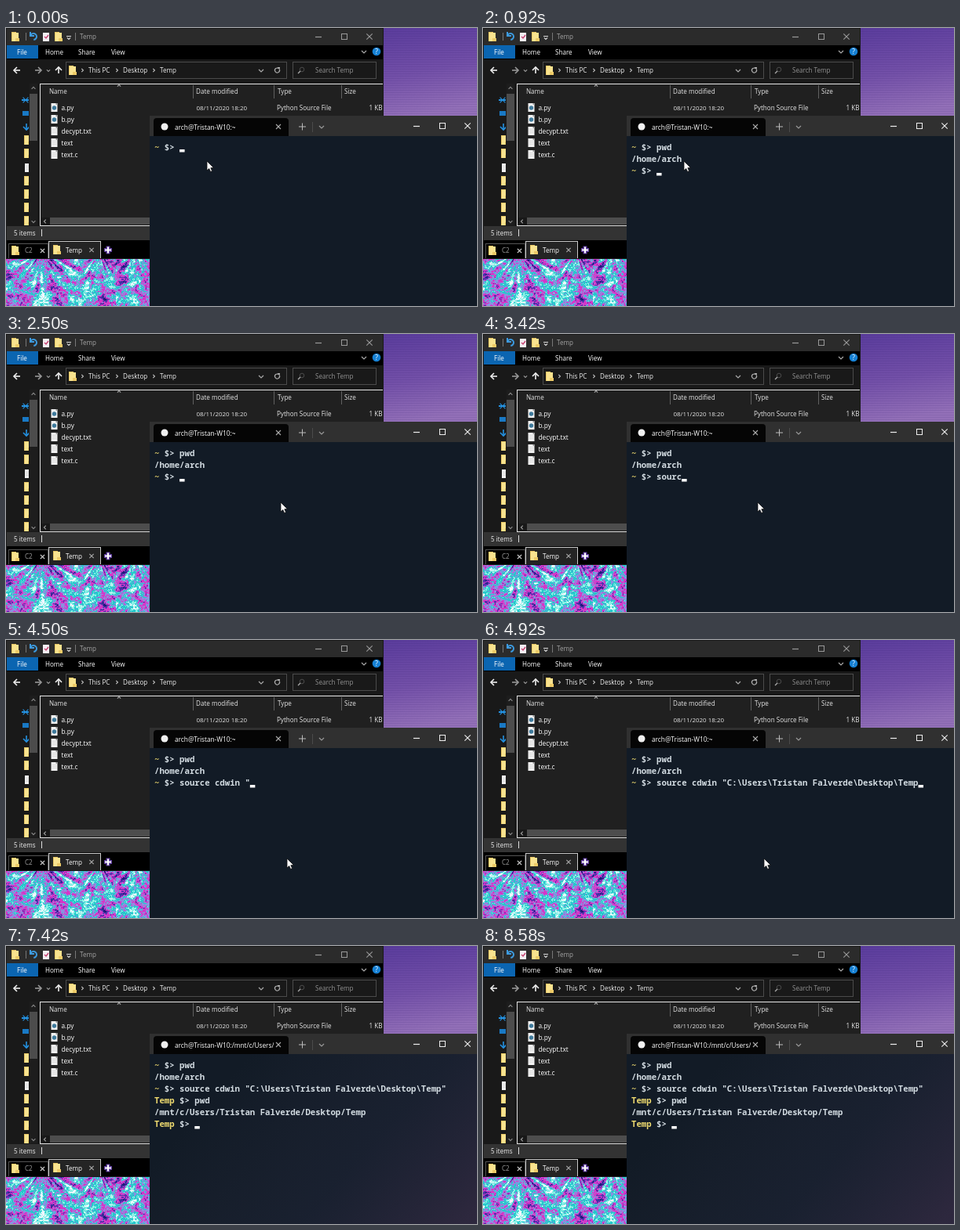
An HTML page with a canvas for the animation above (8660 ms loop, 600 by 355 pixels).

```html
<!DOCTYPE html>
<html lang="en">
<head>
<meta charset="utf-8">
<title>Jump to a folder from the terminal</title>
<style>
  html, body { margin: 0; width: 100%; height: 100%; overflow: hidden; background: #000; }
  canvas { display: block; }
</style>
</head>
<body>
<canvas id="stage" width="600" height="355"></canvas>
<script>
const ctx = document.getElementById('stage').getContext('2d');
const LOOP = 8660, STEP = 1000 / 12;
const UI = '"Open Sans", "Noto Sans", sans-serif';
const MONO = '600 10.7px "Noto Sans Mono", "DejaVu Sans Mono", monospace';
const YELLOW = '#f0dc70', PALE = '#d3dce2';
const HOST = 'Tristan-W10', USER = 'Tristan Falverde';

// Timeline, in ms
const EXPLORER_FRONT = [1410, 2410];
const PWD = [250, 620, 830], JUMP = [2900, 4350], PASTE = 4750, ENTER = 5480;
const PWD_AGAIN = [6250, 6650, 6950];
const MOUSE = [[0, 256, 170], [950, 256, 170], [1580, 246, 51], [1950, 246, 51],
               [2420, 350, 215], [3750, 350, 215], [4420, 358, 279]];
const MOUSE_HIDDEN = 5250;

function rect(x, y, w, h, fill) { ctx.fillStyle = fill; ctx.fillRect(x, y, w, h); }

function frame(x, y, w, h, color) {
  ctx.strokeStyle = color;
  ctx.lineWidth = 1;
  ctx.strokeRect(x + 0.5, y + 0.5, w - 1, h - 1);
}

function disc(x, y, r, fill) {
  ctx.fillStyle = fill;
  ctx.beginPath();
  ctx.arc(x, y, r, 0, 7);
  ctx.fill();
}

function line(color, width, ...points) {
  ctx.strokeStyle = color;
  ctx.lineWidth = width;
  ctx.beginPath();
  for (const [x, y] of points) ctx.lineTo(x, y);
  ctx.stroke();
}

function label(text, x, y, color = '#f0f0f0', size = 8.1, align = 'left') {
  ctx.font = `500 ${size}px ${UI}`;
  ctx.textAlign = align;
  ctx.fillStyle = color;
  ctx.fillText(text, x, y);
}

function chevron(x, y, dx, dy, color = '#aaa') {
  // dx, dy give the pointing direction
  line(color, 1.2, [x - dx - dy * 3, y - dy - dx * 3], [x + dx * 2, y + dy * 2],
    [x - dx + dy * 3, y - dy + dx * 3]);
}

function cross(x, y, r, color) {
  line(color, 1.1, [x - r, y - r], [x + r, y + r]);
  line(color, 1.1, [x + r, y - r], [x - r, y + r]);
}

function arrow(x, y, dx, dy, color) {
  line(color, 1.6, [x - dx * 4, y - dy * 4], [x + dx * 4, y + dy * 4]);
  line(color, 1.6, [x - dy * 4, y - dx * 4], [x + dx * 4, y + dy * 4], [x + dy * 4, y + dx * 4]);
}

function folder(x, y) {
  rect(x - 5, y - 6, 6, 12, '#e8c765');
  rect(x - 4, y - 5, 8, 11, '#f9e38f');
  rect(x, y + 2, 5, 4, '#edcb68');
}

function sheet(x, y, isPython) {
  rect(x - 4, y - 5, 8, 11, '#f1f1f1');
  rect(x + 2, y - 5, 2, 2, '#9a9a9a');
  if (isPython) disc(x, y + 1, 2.7, '#3e7a9c');
  else for (let i = -2; i < 4; i += 2) rect(x - 3, y + i, 6, 0.6, '#cfcfcf');
}

function captionButtons(xs, y, color) {
  line(color, 1.2, [xs[0] - 4, y + 0.5], [xs[0] + 4, y + 0.5]);
  frame(xs[1] - 4, y - 4, 8, 8, color);
  cross(xs[2], y, 3.7, color);
}

function hash(x, y) {
  const s = Math.sin(x * 127.1 + y * 311.7) * 43758.5453;
  return s - Math.floor(s);
}

function noise(x, y) {
  const i = Math.floor(x), j = Math.floor(y), u = x - i, v = y - j;
  const mix = (a, b, k) => a + (b - a) * k * k * (3 - 2 * k);
  return mix(mix(hash(i, j), hash(i + 1, j), u), mix(hash(i, j + 1), hash(i + 1, j + 1), u), v);
}

// Streaks that fan out downwards from the nearest summit
function mountainShade(x, y) {
  const summit = x < 92 ? 45 : x < 140 ? 118 : 165;
  const dx = x - summit, dy = y - 284;
  const streak = noise(Math.atan2(dx, dy) * 9 + summit, Math.hypot(dx, dy) / 22);
  const fold = noise((x - y) / 13, (x * 0.5 + y) / 9);
  return streak * 0.5 + fold * 0.4 + noise(x / 2.5, y / 2) * 0.35 - 0.12;
}

function paintWallpaper(g) {
  const sky = g.createLinearGradient(480, 0, 500, 115);
  sky.addColorStop(0, '#5a3c9c');
  sky.addColorStop(0.55, '#7350a8');
  sky.addColorStop(1, '#9370b8');
  g.fillStyle = sky;
  g.fillRect(480, 0, 120, 115);
  g.fillStyle = 'rgba(40,20,100,.1)';
  for (let y = 1; y < 115; y += 3) g.fillRect(480, y, 120, 1);

  const tones = ['#1c1c78', '#5434b0', '#d636c8', '#8c90e0', '#25c8cc', '#8cf0e6', '#f6f6ff'];
  for (let y = 294; y < 355; y++) {
    for (let x = 0; x < 184; x++) {
      const value = mountainShade(x, y) + (hash(x, y) - 0.5) * 0.14;
      const tone = Math.floor(value * 8 - 0.4);
      g.fillStyle = tones[Math.max(0, Math.min(tones.length - 1, tone))];
      g.fillRect(x, y, 1, 1);
    }
  }
}

const wallpaper = document.createElement('canvas');
wallpaper.width = 600;
wallpaper.height = 355;
paintWallpaper(wallpaper.getContext('2d'));

function drawToolbar(active) {
  const bright = active ? '#fff' : '#a5a5a5';
  rect(0, 0, 481, 40, '#000');
  rect(0, 40, 481, 30, '#191919');
  if (!active) rect(0, 1, 480, 21, '#2b2b2b');
  folder(12, 11);
  folder(67, 11);
  ctx.strokeStyle = '#3d9be0';
  ctx.lineWidth = 2;
  ctx.beginPath();
  ctx.arc(35, 11, 4, -2.5, 1.5);
  ctx.stroke();
  line('#3d9be0', 2, [31, 5], [31, 10], [36, 10]);
  rect(47, 6, 8, 11, '#f3eef3');
  line('#c64070', 1.4, [49, 11], [51, 13], [54, 9]);
  rect(25, 6, 1, 10, '#777');
  rect(77, 10, 6, 1, '#ddd');
  chevron(80, 13, 0, 0.7, '#ddd');
  rect(88, 6, 1, 10, '#777');
  label('Temp', 94, 14, bright);
  captionButtons([398, 431, 463], 11, active ? '#fff' : '#999');

  rect(0, 22, 41, 17, '#0b65b1');
  [['File', 14], ['Home', 50], ['Share', 92], ['View', 134]].forEach(([s, x]) => label(s, x, 34, '#fff'));
  chevron(456, 30, 0, 1);
  disc(472, 30, 5.3, '#1681d4');
  label('?', 472, 33, '#fff', 8.5, 'center');

  arrow(14, 54, -1, 0, '#f0f0f0');
  arrow(41, 54, 1, 0, '#999');
  chevron(54, 54, 0, 0.7, '#999');
  arrow(67, 54, 0, -1, '#f0f0f0');
  frame(76, 43, 282, 22, '#4b4b4b');
  folder(85, 54);
  [97, 141, 188].forEach(x => chevron(x, 54, 0.7, 0, '#bbb'));
  label('This PC', 105, 57);
  label('Desktop', 149, 57);
  label('Temp', 196, 57);
  chevron(325, 54, 0, 1);
  ctx.strokeStyle = '#aaa';
  ctx.beginPath();
  ctx.arc(345.5, 54, 3, -0.6, 5);
  ctx.stroke();
  rect(346, 50, 3, 2, '#aaa');
  frame(365, 43, 107, 22, '#4b4b4b');
  ctx.beginPath();
  ctx.arc(377, 53, 2.8, 0, 7);
  ctx.stroke();
  line('#aaa', 1.2, [375, 55], [372, 58]);
  label('Search Temp', 394, 57, '#929292');
}

function drawSidebar() {
  rect(0, 70, 44, 183, '#191919');
  ctx.save();
  ctx.beginPath();
  ctx.rect(0, 71, 29, 181);
  ctx.clip();
  cross(25, 92, 3.4, '#2492e2');
  rect(20, 91, 9, 2, '#2492e2');
  rect(21, 106, 8, 6, '#1979c5');
  arrow(26, 126, 0, 1, '#2492e2');
  [143, 160, 195, 212, 229, 246].forEach(y => folder(28, y));
  sheet(28, 178, false);
  ctx.restore();
  rect(30, 71, 10, 181, '#1d1d1d');
  rect(30, 84, 10, 60, '#4c4c4c');
  chevron(35, 77, 0, -0.8, '#888');
  chevron(35, 247, 0, 0.8, '#888');
}

function drawFileList() {
  rect(43, 70, 438, 183, '#202020');
  [[238, 'Date modified', 242], [341, 'Type', 346], [427, 'Size', 431]].forEach(([x, s, tx]) => {
    rect(x, 73, 1, 17, '#606060');
    label(s, tx, 84, '#e4e4e4');
  });
  label('Name', 55, 84, '#e4e4e4');
  chevron(144, 74, 0, -0.7);
  [['a.py', '08/11/2020 18:20', 'Python Source File', 1],
   ['b.py', '06/03/2021 18:46', 'Python Source File', 1],
   ['decypt.txt', '08/11/2020 17:33', 'TXT File', 5],
   ['text', '11/07/2021 01:15', 'File', 9],
   ['text.c', '11/07/2021 01:28', 'C File', 2]].forEach(([name, date, type, size], i) => {
    const y = 104.5 + i * 15.1;
    sheet(61.5, Math.round(y - 3.5), name.endsWith('.py'));
    label(name, 70.5, y, '#fff', 8.3);
    label(date, 242.5, y, '#e6e6e6', 7.95);
    label(type, 345, y, '#e6e6e6');
    label(size + ' KB', 479.5, y, '#e6e6e6', 8.1, 'right');
  });
  rect(45, 242, 434, 10, '#181818');
  rect(56, 242, 402, 9, '#4d4d4d');
  chevron(50, 247, -0.8, 0, '#999');
  chevron(474, 247, 0.8, 0, '#999');
  frame(43, 71, 438, 182, '#e2e2e2');
}

function drawExplorer(active) {
  drawToolbar(active);
  drawSidebar();
  drawFileList();
  rect(0, 253, 481, 18, '#333');
  label('5 items', 10, 265);
  rect(45, 257, 1, 9, '#ddd');
  rect(445, 254, 12, 15, '#666');
  for (let y = 257; y < 267; y += 2) rect(449, y, 3, 1, '#fff');
  rect(464, 257, 10, 8, '#eee');
  rect(466, 261, 6, 2, '#444');

  rect(0, 271, 481, 23, '#000');
  frame(3, 275, 51, 20, '#555');
  rect(54, 272, 67, 22, '#242424');
  frame(54, 272, 67, 23, '#c9c9c9');
  folder(12, 284);
  label('C2', 24, 287, '#9b9b9b');
  cross(46.5, 284.5, 2.7, '#ddd');
  folder(65, 283);
  label('Temp', 76, 286.5, '#fff');
  cross(109, 283.5, 2.7, '#aaa');
  rect(125, 281, 10, 5, '#5d3b9c');
  rect(127.5, 278.5, 5, 10, '#5d3b9c');
  rect(126, 282.5, 8, 2, '#fff');
  rect(129, 279.5, 2, 8, '#fff');
  frame(0, 0, 481, 295, '#191919');
}

// Part of a command that has been typed by time t
function typed(text, t, [start, end]) {
  const count = Math.ceil((t - start) / (end - start) * text.length);
  return text.slice(0, Math.max(0, count));
}

function terminalLines(t) {
  const home = text => ['~', ' $> ' + text], temp = text => ['Temp', ' $> ' + text];
  const lines = [home(typed('pwd', t, PWD))];
  if (t < PWD[2]) return lines;
  let command = typed('source cdwin "', t, JUMP);
  if (t >= PASTE) command += `C:\\Users\\${USER}\\Desktop\\Temp`;
  if (t >= PASTE + 400) command += '"';
  lines.push(['', '/home/arch'], home(command));
  if (t < ENTER) return lines;
  lines.push(temp(typed('pwd', t, PWD_AGAIN)));
  if (t >= PWD_AGAIN[2]) lines.push(['', `/mnt/c/Users/${USER}/Desktop/Temp`], temp(''));
  return lines;
}

function drawTerminal(t, active) {
  const jumped = t >= ENTER;
  rect(183, 112, 417, 26, active ? '#303030' : '#363636');
  rect(183, 138, 417, 217, active ? '#121b26' : '#0e1922');
  if (jumped) {
    const glow = ctx.createLinearGradient(300, 150, 560, 380);
    glow.addColorStop(0, 'rgba(36,40,58,0)');
    glow.addColorStop(0.55, 'rgba(30,36,54,.6)');
    glow.addColorStop(1, 'rgba(50,42,66,.85)');
    rect(183, 138, 417, 217, glow);
  }
  ctx.fillStyle = '#050505';
  ctx.beginPath();
  ctx.roundRect(188, 115, 172, 23, [4, 4, 0, 0]);
  ctx.fill();
  disc(202, 126, 4.5, '#f0f0f0');
  ctx.save();
  ctx.beginPath();
  ctx.rect(188, 115, 153, 23);
  ctx.clip();
  label(`arch@${HOST}:` + (jumped ? '/mnt/c/Users/' + USER : '~'), 215, 129.5, '#fff', 8.3);
  ctx.restore();
  cross(347, 126, 3, '#aaa');
  rect(373, 125.5, 9, 1, '#bbb');
  rect(377, 121.5, 1, 9, '#bbb');
  rect(390, 120, 1, 13, '#4b4b4b');
  chevron(402, 126, 0, 1, '#999');
  captionButtons([523, 556, 588], 125, '#eee');

  ctx.font = MONO;
  ctx.textAlign = 'left';
  const charWidth = ctx.measureText('0').width;
  const lines = terminalLines(t);
  lines.forEach(([place, rest], i) => {
    const y = 155.5 + i * 15;
    ctx.fillStyle = YELLOW;
    ctx.fillText(place, 189, y);
    ctx.fillStyle = PALE;
    ctx.fillText(rest, 189 + place.length * charWidth, y);
  });
  const last = lines.length - 1;
  rect(189 + lines[last].join('').length * charWidth, 155 + last * 15, 6.5, 3.5, '#fff');
}

function drawMouse(t) {
  if (t >= MOUSE_HIDDEN) return;
  let [, x, y] = MOUSE[MOUSE.length - 1];
  const i = MOUSE.findIndex(key => key[0] > t);
  if (i > 0) {
    const [t0, x0, y0] = MOUSE[i - 1], [t1, x1, y1] = MOUSE[i];
    const k = (t - t0) / (t1 - t0), e = k * k * (3 - 2 * k);
    x = x0 + (x1 - x0) * e;
    y = y0 + (y1 - y0) * e;
  }
  ctx.save();
  ctx.translate(x, y);
  ctx.fillStyle = '#fff';
  ctx.strokeStyle = '#111';
  ctx.lineWidth = 0.8;
  ctx.beginPath();
  [[0, 0], [0, 12], [2.7, 9.5], [4.6, 13.5], [6.6, 12.6], [4.8, 8.7], [8.5, 8.5]]
    .forEach(p => ctx.lineTo(...p));
  ctx.closePath();
  ctx.fill();
  ctx.stroke();
  ctx.restore();
}

function render() {
  const t = Math.floor((performance.now() % LOOP) / STEP + 0.05) * STEP;
  const explorerFront = t >= EXPLORER_FRONT[0] && t < EXPLORER_FRONT[1];
  ctx.drawImage(wallpaper, 0, 0);
  if (explorerFront) {
    drawTerminal(t, false);
    drawExplorer(true);
  } else {
    drawExplorer(false);
    drawTerminal(t, true);
  }
  drawMouse(t);
  requestAnimationFrame(render);
}
render();
</script>
</body>
</html>
```
